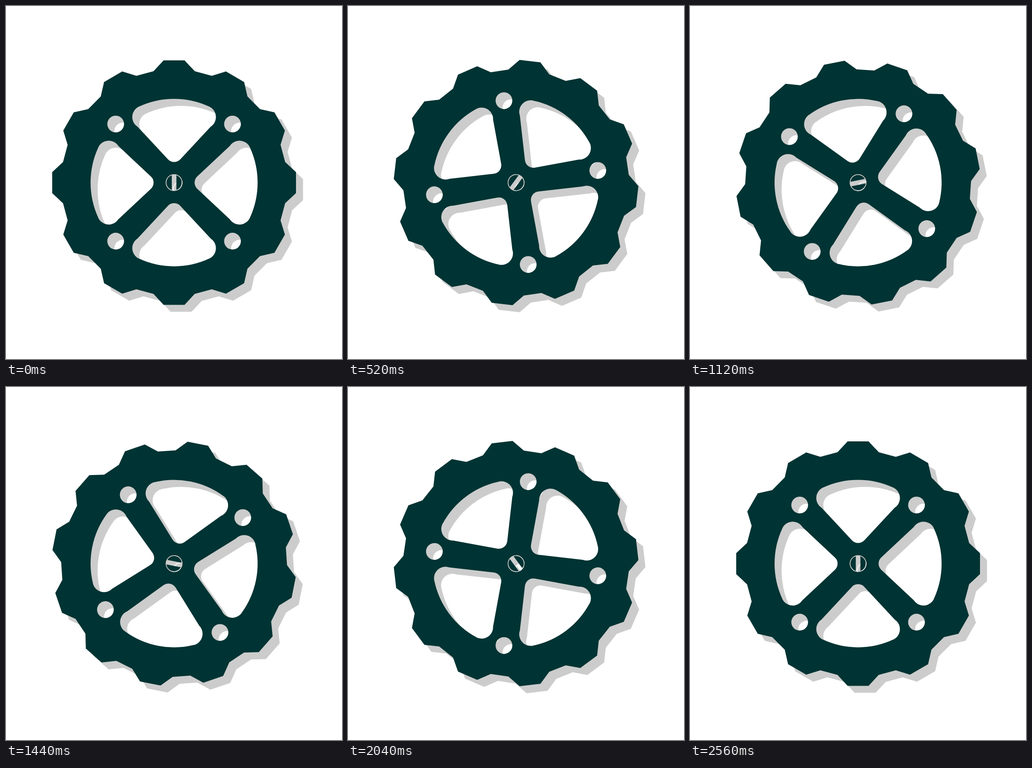
Recreate the animation shown at these times as an HTML page with a canvas. Size 731 by 766 pixels, loop 2.6 s.

```html
<!DOCTYPE html>
<html lang="en">
<head>
<meta charset="utf-8">
<title>Turning gear</title>
<style>
  html, body { margin: 0; width: 100%; height: 100%; overflow: hidden; background: #fff; }
  canvas { display: block; }
</style>
</head>
<body>
<canvas id="stage" width="731" height="766"></canvas>
<script>
const ctx = document.getElementById('stage').getContext('2d');
const WIDTH = 731, HEIGHT = 766;
const CENTER = { x: 365.7, y: 383.2 };
const SHADOW = { x: 15.3, y: 15.2 };
const LOOP = 2600, STEP = 40, STEPS_PER_HALF_TURN = 64;
const rad = deg => deg * Math.PI / 180;

function addCircle(path, x, y, r) {
  path.moveTo(x + r, y);
  path.arc(x, y, r, 0, 2 * Math.PI);
  path.closePath();
}

function teeth() {
  const path = new Path2D();
  const profile = [[-10.5, 245.7], [-4.91, 266.2], [4.91, 266.2], [10.5, 245.7]];
  for (let i = 0; i < 12; i++) {
    for (const [offset, r] of profile) {
      const a = rad(i * 30 + offset);
      path.lineTo(r * Math.sin(a), -r * Math.cos(a));
    }
  }
  path.closePath();
  return path;
}

// Rounded sector pointing up, with its tip towards the hub.
function sector() {
  const path = new Path2D();
  const corner = { x: 66, y: -142.3, r: 25 };
  const apexY = -36, tipRadius = 18.5, rimRadius = 181.7;
  const rimAngle = Math.atan2(corner.y, corner.x);
  const endAngle = rad(56.6);
  const endX = corner.x + corner.r * Math.cos(endAngle);
  const endY = corner.y + corner.r * Math.sin(endAngle);
  path.arc(0, 0, rimRadius, -Math.PI - rimAngle, rimAngle);
  path.arc(corner.x, corner.y, corner.r, rimAngle, endAngle);
  path.arcTo(0, apexY, -endX, endY, tipRadius);
  path.lineTo(-endX, endY);
  path.arc(-corner.x, corner.y, corner.r, Math.PI - endAngle, Math.PI - rimAngle);
  path.closePath();
  return path;
}

function buildGear() {
  const gear = teeth();
  const opening = sector();
  for (let i = 0; i < 4; i++) {
    gear.addPath(opening, new DOMMatrix().rotate(i * 90));
    const a = rad(45 + i * 90);
    addCircle(gear, 179.7 * Math.cos(a), 179.7 * Math.sin(a), 18.2);
  }

  // Slotted screw: a round gap holding two halves of a disc.
  const discRadius = 16.6, slotHalf = 5;
  const a = Math.acos(slotHalf / discRadius);
  addCircle(gear, 0, 0, 18.3);
  for (const facing of [0, Math.PI]) {
    gear.moveTo(discRadius * Math.cos(facing - a), discRadius * Math.sin(facing - a));
    gear.arc(0, 0, discRadius, facing - a, facing + a);
    gear.closePath();
  }
  return gear;
}

const gear = buildGear();

function drawGear(x, y, angle, color) {
  ctx.save();
  ctx.translate(x, y);
  ctx.rotate(angle);
  ctx.fillStyle = color;
  ctx.fill(gear, 'evenodd');
  ctx.restore();
}

function render(time) {
  const step = Math.floor((time % LOOP) / STEP);
  const angle = step * Math.PI / STEPS_PER_HALF_TURN;
  ctx.fillStyle = '#fff';
  ctx.fillRect(0, 0, WIDTH, HEIGHT);
  drawGear(CENTER.x + SHADOW.x, CENTER.y + SHADOW.y, angle, '#ccc');
  drawGear(CENTER.x, CENTER.y, angle, '#033');
}

const start = performance.now();
function tick() {
  render(performance.now() - start);
  requestAnimationFrame(tick);
}
tick();
</script>
</body>
</html>
```
